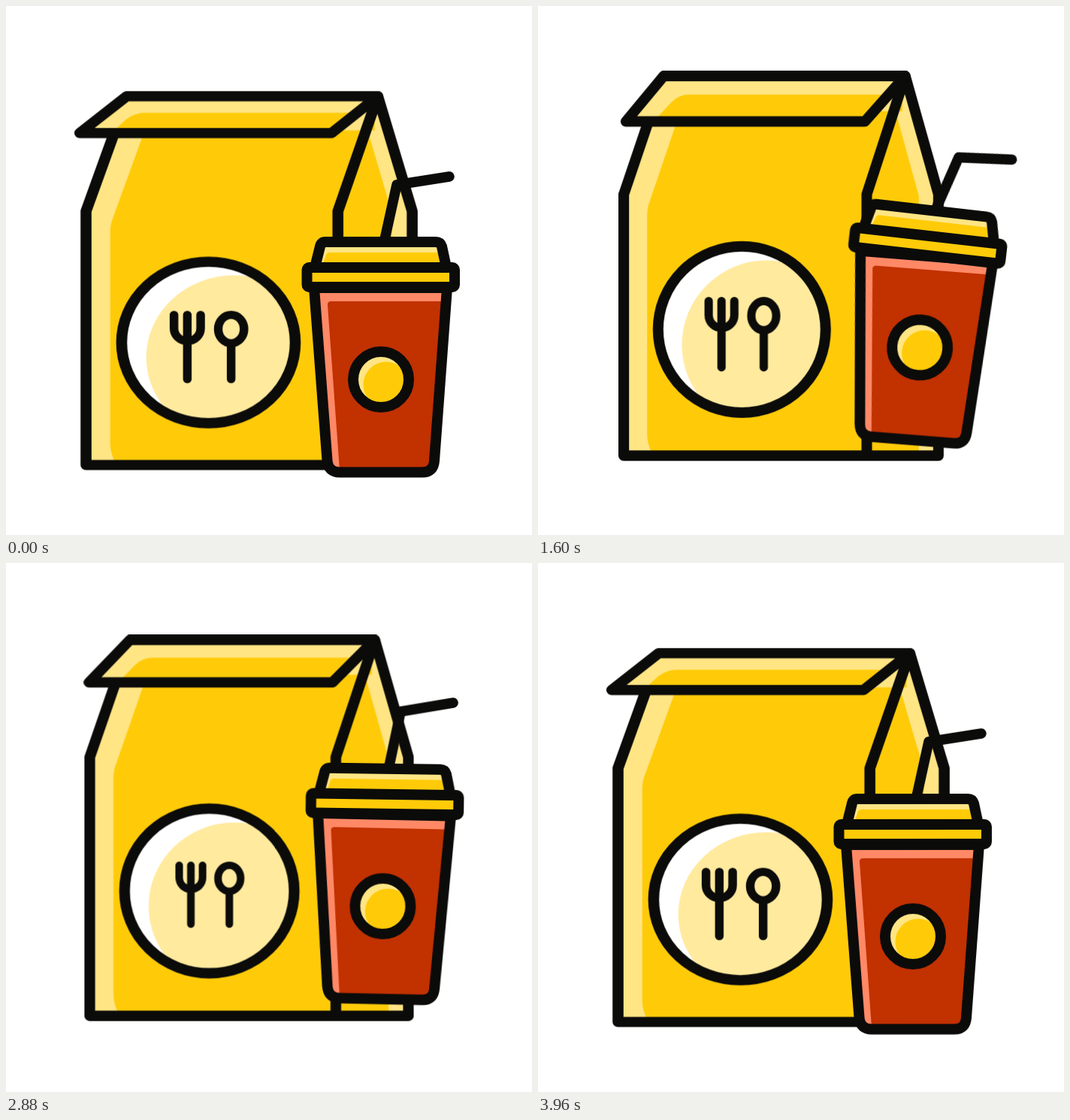
Write an HTML page that moves like this. It is 700 by 704 pixels and loops after 4000 ms.

```html
<!DOCTYPE html>
<html lang="en">
<head>
<meta charset="utf-8">
<title>Takeaway bag and drink</title>
<style>
  html, body { margin: 0; height: 100%; overflow: hidden; background: #fff; }
  svg { display: block; width: 100vw; height: 100vh; }

  .line { stroke: #0b0b0a; stroke-width: 14; stroke-linecap: round; stroke-linejoin: round; fill: none; }
  .thin { stroke-width: 11; }
  .straw { stroke-width: 13.5; }
  .yellow { fill: #ffcb08; }
  .pale { fill: #ffe584; }
  .cream { fill: #ffea9e; }
  .white { fill: #fff; }
  .red { fill: #c23100; }
  .pink { fill: #ff8966; }

  .move { animation: 4s cubic-bezier(.333, 0, .667, 1) infinite; }
  .bag { transform-origin: 323.5px 1031px; animation-name: squash; }
  .flap { animation-name: flap; }
  .flap-front { animation-name: flap-front; }
  .cutlery { transform-origin: 272px 424px; animation-name: pulse; animation-duration: 2s; }
  .rise { animation-name: rise; }
  .cup { transform-origin: 499px 613px; animation-name: rock; }
  .lid { transform-origin: 499px 361px; animation-name: lid; }
  .sip { transform-origin: 503px 315px; animation-name: sip; }

  @keyframes squash {
    0%, 100% { transform: scale(1.041, .968); }
    50% { transform: scale(1, 1); }
  }
  @keyframes flap {
    0%, 100% { d: path("M167 90 L488 90 L429 140.5 L107 140.5 Z"); }
    50% { d: path("M168 90 L488 90 L435 152 L119 152 Z"); }
  }
  @keyframes flap-front {
    0%, 100% { d: path("M147 141 L166 122 Q177 112.6 191 112.6 L463 112.6 L429 141 Z"); }
    50% { d: path("M155 152 L180 125 Q189 115 203 115 L467 115 L435 152 Z"); }
  }
  @keyframes pulse {
    0%, 12%, 60%, 100% { transform: scale(1); }
    36% { transform: scale(.862); }
  }
  @keyframes rise {
    0%, 3%, 100% { transform: translateY(0); }
    57% { transform: translateY(-56px); }
  }
  @keyframes rock {
    0%, 100% { transform: rotate(0deg); }
    25.75% { transform: rotate(-.6deg); }
    36.25% { transform: rotate(11.7deg); }
    45.5% { transform: rotate(-8deg); }
    55% { transform: rotate(6.4deg); }
    65% { transform: rotate(-3.2deg); }
    75% { transform: rotate(2.4deg); }
    88% { transform: rotate(-.5deg); }
  }
  @keyframes lid {
    0%, 22%, 93%, 100% { transform: rotate(0deg); }
    30% { transform: rotate(.3deg); }
    41% { transform: rotate(2deg); }
    50% { transform: rotate(-1.8deg); }
    58.5% { transform: rotate(1deg); }
    67.5% { transform: rotate(-1deg); }
    80.5% { transform: rotate(1.1deg); }
  }
  @keyframes sip {
    0%, 22%, 90%, 100% { transform: rotate(0deg); }
    31% { transform: rotate(-2.2deg); }
    41% { transform: rotate(5deg); }
    50% { transform: rotate(-7deg); }
    60% { transform: rotate(4deg); }
    67.5% { transform: rotate(-3deg); }
    78% { transform: rotate(1.2deg); }
  }
</style>
</head>
<body>
<svg viewBox="0 0 700 704">
  <defs>
    <clipPath id="plate"><circle cx="271.5" cy="428.5" r="111"/></clipPath>
    <clipPath id="badge"><circle cx="499" cy="497" r="37"/></clipPath>
  </defs>

  <g class="move bag">
    <!-- front and side panels -->
    <path class="pale" d="M168 90 H488 L532 248 V597 H115 V248 Z"/>
    <path class="yellow" d="M190 137 L148.5 260 Q146 267 146 277 V568 Q146 582 154 597 H437 V248 L484 100 V137 Z"/>
    <path class="yellow" d="M437 248 L475 137 L506 250 V597 H437 Z"/>
    <path class="line" d="M168 90 L115 248 V597 H532 V248 L488 90 L437 248 V597"/>

    <!-- folded top -->
    <path class="move flap pale" d="M168 90 L488 90 L435 152 L119 152 Z"/>
    <path class="move flap-front yellow" d="M155 152 L180 125 Q189 115 203 115 L467 115 L435 152 Z"/>
    <path class="move flap line" d="M168 90 L488 90 L435 152 L119 152 Z"/>

    <!-- plate with fork and spoon -->
    <circle class="white" cx="271.5" cy="428.5" r="111"/>
    <circle class="cream" cx="305" cy="449" r="113" clip-path="url(#plate)"/>
    <circle class="line" cx="271.5" cy="428.5" r="111"/>
    <g class="move cutlery">
      <path class="line thin" d="M227.5 390.5 V409 A17 17.5 0 0 0 261.5 409 V390.5 M244.5 390.5 V479 M300.5 430 V479"/>
      <ellipse class="line thin" cx="300.5" cy="410" rx="16.5" ry="19.5"/>
    </g>
  </g>

  <g class="move rise">
    <g class="move cup">
      <path class="pink" d="M410 375 L427.5 605 Q429 620.5 444 620.5 H554 Q569 620.5 570 605 L587 375 Z"/>
      <path class="red" d="M428 398 Q427.5 393 433 393 H586 L570 605 Q569 618 554 618 H444 Z"/>
      <path class="line" d="M410 375 L427.5 605 Q429 620.5 444 620.5 H554 Q569 620.5 570 605 L587 375 Z"/>
      <circle class="pale" cx="499" cy="497" r="37"/>
      <circle class="yellow" cx="506" cy="504" r="30.5" clip-path="url(#badge)"/>
      <circle class="line" cx="499" cy="497" r="37"/>

      <g class="move lid">
        <path class="move sip line straw" d="M503 315 L520 238 L590 227"/>
        <path class="pale" d="M411 348 L418 320 Q419 314 425 314 H572 Q578 314 580 320 L586 348 Z"/>
        <path class="yellow" d="M420 348 L426 331 Q427 328 431 328 H582 L586 348 Z"/>
        <path class="line" d="M411 348 L418 320 Q419 314 425 314 H572 Q578 314 580 320 L586 348 Z"/>
        <rect class="line" style="fill:#ffcb08" x="400.5" y="348" width="196.5" height="26" rx="3"/>
      </g>
    </g>
  </g>
</svg>
</body>
</html>
```
